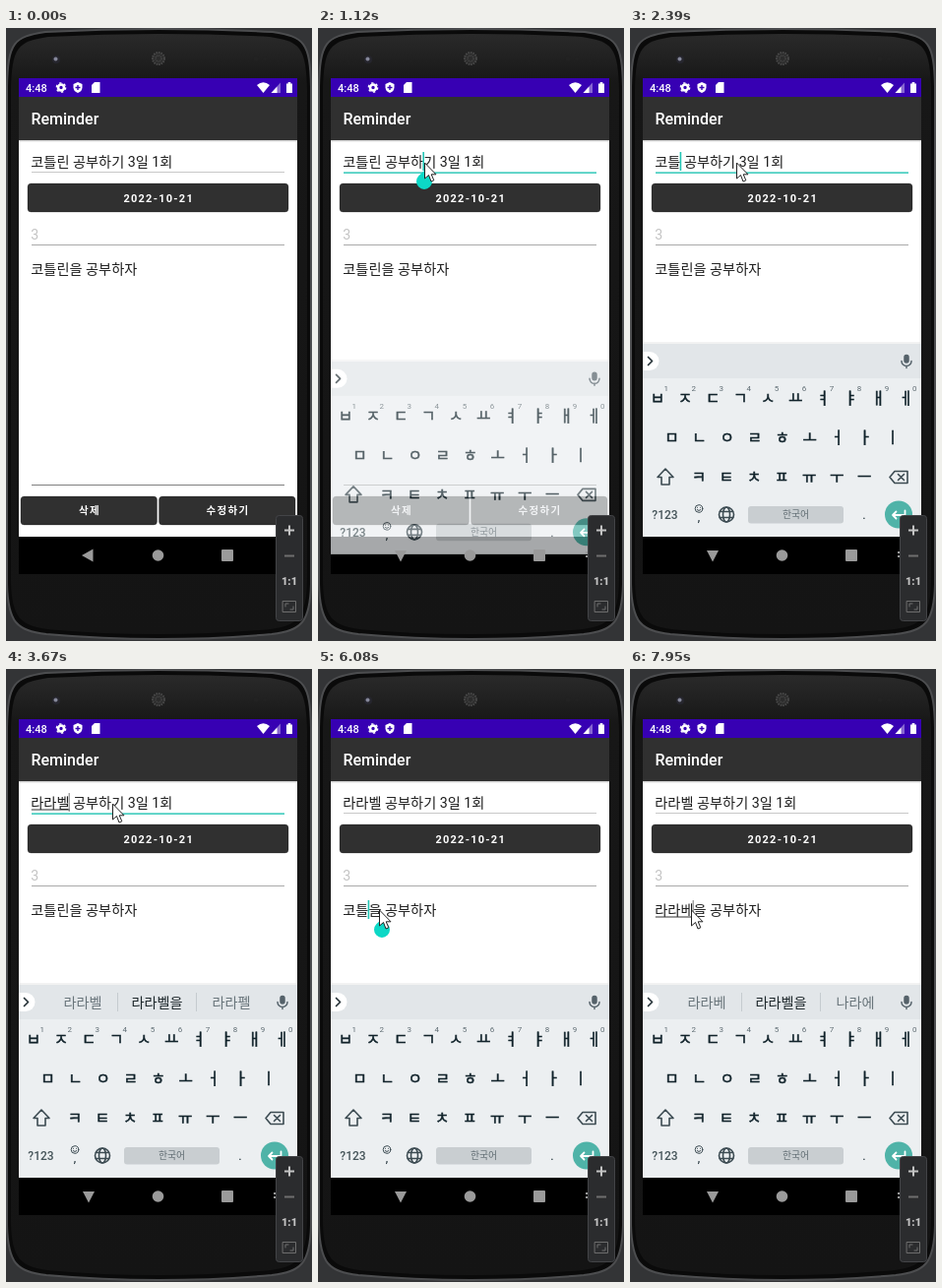
These frames come from a looping animation (311x623 px, 8 s). An HTML page:

```html
<!DOCTYPE html>
<html lang="ko">
<head>
<meta charset="utf-8">
<title>Reminder</title>
<style>
  html, body { margin: 0; width: 100%; height: 100%; overflow: hidden; background: #333436; }
  svg { display: block; font-family: Roboto, "Noto Sans CJK KR", "Noto Sans CJK", sans-serif; }
  text { white-space: pre; }
  .mid { text-anchor: middle; }
  .field { font-size: 14.2px; fill: #1c1c1c; }
  .button { font-size: 10.5px; font-weight: 700; letter-spacing: 1.3px; fill: #fff; }
  .jamo { stroke: #10222a; stroke-width: .5px; }
  .raised { fill: #303030; stroke: #000; stroke-opacity: .22; }
  .line { fill: none; stroke-linecap: round; stroke-linejoin: round; }
</style>
</head>
<body>
<svg width="311" height="623" viewBox="0 0 311 623">
  <defs>
    <clipPath id="screen"><rect x="13" y="51" width="283" height="504"/></clipPath>
    <linearGradient id="shade" x2="0" y2="1">
      <stop stop-color="#000" stop-opacity=".2"/><stop offset="1" stop-color="#000" stop-opacity="0"/>
    </linearGradient>
    <linearGradient id="face" x2="0" y2="1">
      <stop stop-color="#2a2a2a"/><stop offset=".08" stop-color="#171717"/><stop offset="1" stop-color="#141414"/>
    </linearGradient>
    <path id="shell" d="M1 60C2 14 8 9 40 4Q155-2 271 4C303 9 309 14 310 60V565C309 605 300 612 270 616Q155 626 41 616C11 612 2 605 1 565Z"/>
    <path id="drop" d="M0 0 5.7 5.3A8 8 0 1 1-5.7 5.3Z" fill="#0cd8c6"/>
  </defs>

  <!-- phone body -->
  <use href="#shell" fill="#0a0a0a" stroke="#4c4d4f" stroke-width="2"/>
  <use href="#shell" fill="url(#face)" transform="translate(4 5) scale(.974 .984)"/>
  <circle cx="51" cy="32" r="4" fill="#26262e"/><circle cx="50.5" cy="31.5" r="2" fill="#85879a"/>
  <circle cx="155" cy="31" r="6" fill="#2c2c2c" stroke="#4a4a4a" stroke-width="2" stroke-dasharray="1.5 1"/>
  <circle cx="155" cy="31" r="3" fill="none" stroke="#4a4a4a" stroke-width="1.5" stroke-dasharray="1 1"/>
  <circle cx="254" cy="31" r="2.5" fill="#222"/><circle cx="263" cy="31" r="2" fill="#222"/>

  <g clip-path="url(#screen)">
    <rect x="13" y="51" width="283" height="504" fill="#fff"/>
    <rect x="13" y="51" width="283" height="19" fill="#3700b3"/>
    <g fill="#fff">
      <text x="20" y="64.5" font-size="11" font-weight="500">4:48</text>
      <circle cx="56" cy="60.5" r="3" fill="none" stroke="#fff" stroke-width="2.6"/>
      <circle cx="56" cy="60.5" r="4.7" fill="none" stroke="#fff" stroke-width="1.3" stroke-dasharray="2.4 2.5"/>
      <path d="M73 55 77.5 57V60.5Q77.3 64.5 73 66 68.7 64.5 68.5 60.5V57Z"/>
      <path d="M73 58v5M70.5 60.5h5" stroke="#3700b3" stroke-width="1.4"/>
      <path d="M90 55H95.500V66H87V58Z"/>
      <path d="M255 58Q261.5 52.5 268 58L261.5 66Z"/>
      <path d="M279 55.500V66H269.500Z" opacity=".4"/><path d="M275.500 59.500V66H269.500Z"/>
      <path d="M285 56.500h1.700V55h2.600v1.500H291V66H285Z"/>
    </g>
    <rect x="13" y="70" width="283" height="44" fill="#303030"/>
    <rect x="13" y="114" width="283" height="2.500" fill="url(#shade)"/>
    <text x="25.5" y="98" font-size="16" font-weight="500" fill="#fff">Reminder</text>

    <rect id="titleLine" x="26" width="257"/>
    <text id="title" class="field" x="25.3" y="140.5"></text>
    <rect class="raised" x="22" y="158" width="265" height="29" rx="3.500"/>
    <text class="mid" x="155.2" y="177" font-size="11" font-weight="700" letter-spacing="1.25" fill="#fff">2022-10-21</text>
    <text x="25.3" y="215" font-size="14.2" fill="#c4c4c4">3</text>
    <rect x="26" y="220" width="257" height="1" fill="#aaa"/>
    <text id="body" class="field" x="25.3" y="249.5"></text>
    <rect x="26" y="464" width="257" height="1" fill="#808080"/>
    <g id="buttons"></g>

    <rect id="under" height="1" fill="#333"/>
    <rect id="caret" height="19"/>
    <use id="handle" href="#drop"/>

    <rect x="13" y="517" width="283" height="38"/>
    <g id="keyboard">
      <rect x="13" y="319" width="283" height="2" fill="#000" opacity=".05"/>
      <rect x="13" y="321" width="283" height="196" fill="#eceff1"/>
      <rect x="13" y="321" width="283" height="35" fill="#e2e6e9"/>
      <path d="M13 329H20A9 9 0 0 1 20 348H13Z" fill="#fff"/>
      <path class="line" d="m18.500 334.500 4 4-4 4" stroke="#263238" stroke-width="1.700"/>
      <g stroke="#55626a" stroke-width="1.500" class="line">
        <rect x="279" y="332.500" width="4" height="7.500" rx="2" fill="#55626a"/>
        <path d="M276 338.500a5 5 0 0 0 10 0M281 343.500v2"/>
      </g>
      <g id="tips">
        <path d="M113.500 329v19M193.500 329v19" stroke="#c5cbcf"/>
        <text class="mid" x="78" y="343.500" font-size="14.200" fill="#68747a"></text>
        <text class="mid" x="153.500" y="343.500" font-size="14.200" font-weight="500" fill="#1b2529"></text>
        <text class="mid" x="229" y="343.500" font-size="14.200" fill="#68747a"></text>
      </g>
      <g id="keys" fill="#10222a"></g>
      <g class="line" stroke="#3c4b52" stroke-width="1.600">
        <path d="M36 448 44 456.500H40V464H32V456.500H28Z"/>
        <path d="M264 456.500 269 450.500H282V462.500H269ZM272.500 453.500l6 6m0-6-6 6"/>
        <circle cx="98" cy="494.500" r="7.500"/><ellipse cx="98" cy="494.500" rx="3.500" ry="7.500"/>
        <path d="M91.500 491.500h13M91.500 497.500h13"/>
        <circle cx="70" cy="488.500" r="3.800" stroke-width="1"/>
        <path d="M68.500 487.300v.1M71.500 487.300v.1M68.200 489.700q1.800 1.800 3.600 0" stroke-width="1"/>
      </g>
      <rect x="120" y="486" width="97" height="17.500" rx="3" fill="#c9ced1"/>
      <text class="mid" x="168.500" y="498" font-size="9.800" fill="#5f6b71">한국어</text>
      <circle cx="273" cy="494.500" r="14" fill="#4fb3a8"/>
      <path class="line" d="M279.500 490.500v4.500H267m3.500-3.500-3.500 3.500 3.500 3.500" stroke="#fff" stroke-width="1.800"/>
    </g>
    <g fill="#9a9a9a">
      <path id="back"/>
      <circle cx="154.500" cy="536" r="5.800"/><rect x="219" y="530" width="12" height="12" rx="1"/>
      <path id="imeIcon" d="M272 532h2v2h-2zM272 536h2v2h-2z"/>
    </g>
  </g>

  <!-- emulator zoom panel -->
  <rect x="274.500" y="495.500" width="27" height="107" rx="3" fill="#2b2c2e" stroke="#434447"/>
  <path d="M283 510.500h10M288 505.500v10" stroke="#c4c4c4" stroke-width="2"/>
  <path d="M283 536.500h10" stroke="#6e6e6e" stroke-width="2"/>
  <text class="mid" x="288" y="566" font-size="11" font-weight="900" fill="#c4c4c4">1:1</text>
  <g class="line" stroke="#6e6e6e"><rect x="281.500" y="582.500" width="13" height="11"/>
    <path d="M284 588v-3h3M292 588v3h-3"/></g>

  <path id="mouse" d="M.5 0V16L4.500 12.500 7 19 9.800 17.800 7.200 11.800H12Z" fill="#fff" stroke="#222" stroke-linejoin="round"/>
</svg>
<script>
const $ = id => document.getElementById(id);
const LOOP = 8000, TEAL = '#22c4b4', LEFT = 25.3;
const FOCUS = 910, BODY_TAP = 4600;

// Static keys and buttons
const label = (x, y, s, size, extra = '') =>
  `<text class="mid" x="${x}" y="${y}" font-size="${size}" ${extra}>${s}</text>`;
const row = (chars, x0, y) => '<g class="jamo">' +
  [...chars].map((c, i) => label(x0 + i * 28.05, y, c, 15.7)).join('') + '</g>';
$('keys').innerHTML =
  row('ㅂㅈㄷㄱㅅㅛㅕㅑㅐㅔ', 28, 381.8) + row('ㅁㄴㅇㄹㅎㅗㅓㅏㅣ', 42.5, 421.8) + row('ㅋㅌㅊㅍㅠㅜㅡ', 70, 461.8) +
  [...'1234567890'].map((d, i) => label(36.7 + i * 28.05, 369, d, 8, 'fill="#5f6c73"')).join('') +
  label(35.5, 499, '?123', 12, 'font-weight="500" fill="#455459"') + label(70, 501, ',', 12) + label(238, 499, '.', 13);
$('buttons').innerHTML = [[15, '삭제'], [155.5, '수정하기']].map(([x, s]) =>
  `<rect class="raised" x="${x}" y="476" width="138.5" height="29" rx="3.5"/>
   <text class="mid button" x="${x + 70}" y="494">${s}</text>`).join('');

// Edits: [time, text before caret, text after caret, composing]
const typing = (words, times, rest) => words.map((w, i) => [times[i], w, rest, true]);
const steps = ['ㄹ', '라', '랄', '라라', '라랍', '라라베', '라라벨'];
const titleEnd = ' 공부하기 3일 1회', bodyEnd = '을 공부하자';
const titleEdits = [
  [0, '코틀린 공부하', '기 3일 1회'],
  [1460, '코틀린 공부', '하기 3일 1회'],
  [1660, '코틀린 공', '부하기 3일 1회'],
  [1860, '코틀린 ', '공부하기 3일 1회'],
  [1990, '코틀린', titleEnd],
  [2390, '코틀', titleEnd],
  [2520, '코', titleEnd],
  [2720, '', titleEnd],
  ...typing(steps, steps.map((_, i) => 3130 + 90 * i), titleEnd)
];
const bodyEdits = [
  [BODY_TAP, '코틀린을 공부하', '자'],
  [5680, '코틀린', bodyEnd],
  [6080, '코틀', bodyEnd],
  [6220, '코', bodyEnd],
  [6420, '', bodyEnd],
  ...typing(steps.slice(0, 6), [6620, 6750, 6950, 7150, 7480, 7670], bodyEnd)
];
const tips = {
  'ㄹ': ['ㄹ', '를', '로'], '라': ['라', '라는', '라고'], '랄': ['랄', '랄라', '날'],
  '라라': ['라라', '라라랜', '나라'], '라랍': ['라랍', '라라벨', '나랍'],
  '라라베': ['라라베', '라라벨을', '나라에'], '라라벨': ['라라벨', '라라벨을', '라라펠']
};
// Teardrop handle: [from, to, x, y]
const handles = [[FOCUS, 1560, 108, 145], [BODY_TAP, 5680, 120.3, 254], [5680, 6150, 65, 254]];
// Pointer: [time, x, y]
const path = [[130, 304, 588], [910, 108, 137], [4070, 108, 137], [4840, 112, 258],
  [4910, 112, 258], [5120, 62, 249], [5300, 54, 247], [5480, 62, 245], [LOOP, 62, 245]];

const clamp = v => Math.max(0, Math.min(1, v));
const show = (id, on) => $(id).style.display = on ? '' : 'none';
const set = (id, attrs) => Object.entries(attrs).forEach(([k, v]) => $(id).setAttribute(k, v));
const latest = (edits, t) => edits.filter(e => e[0] <= t).pop() || edits[0];
const width = s => [...s].reduce((w, c) => w + (c === ' ' ? 3.5 : 13.06), 0);

function pointer(t) {
  const i = Math.max(1, path.findIndex(p => p[0] > t));
  const [t0, x0, y0] = path[i - 1], [t1, x1, y1] = path[i];
  const p = clamp((t - t0) / (t1 - t0)), e = p * p * (3 - 2 * p);
  return [x0 + (x1 - x0) * e, y0 + (y1 - y0) * e];
}

function draw(t) {
  const focused = t >= FOCUS, inBody = t >= BODY_TAP;
  const title = latest(titleEdits, t), body = latest(bodyEdits, t);
  $('title').textContent = title[1] + title[2];
  $('body').textContent = body[1] + body[2];
  const active = focused && !inBody;
  set('titleLine', { y: active ? 146.4 : 146, height: active ? 1.4 : 1, fill: active ? TEAL : '#c8c8c8' });

  const [time, before, , composing] = inBody ? body : title;
  const top = inBody ? 235 : 126, x = LEFT + width(before);
  show('caret', focused && (t - (time || FOCUS)) % 1000 < 500);
  set('caret', { x: x - .8, y: top, width: composing ? 1 : 1.6, fill: composing ? '#777' : TEAL });
  show('under', composing);
  set('under', { x: LEFT + .5, y: top + 16.5, width: width(before) });

  const handle = handles.find(h => t >= h[0] && t < h[1]);
  show('handle', handle);
  if (handle) set('handle', { x: handle[2], y: handle[3] });

  const p = clamp((t - 980) / 280);
  show('keyboard', p > 0);
  set('keyboard', { transform: `translate(0 ${36 * (1 - p)})`, opacity: clamp(p * 1.4) });
  show('imeIcon', p > 0);
  set('back', { d: p > 0 ? 'M78 531H90L84 542.5Z' : 'M77 536 88.5 529.5V542.5Z' });

  show('tips', composing);
  if (composing) $('tips').querySelectorAll('text').forEach((el, i) => el.textContent = tips[before][i]);

  show('mouse', t >= 130);
  set('mouse', { transform: `translate(${pointer(t)})` });
}

const start = performance.now();
function tick() {
  draw((performance.now() - start) % LOOP);
  requestAnimationFrame(tick);
}
tick();
</script>
</body>
</html>
```
